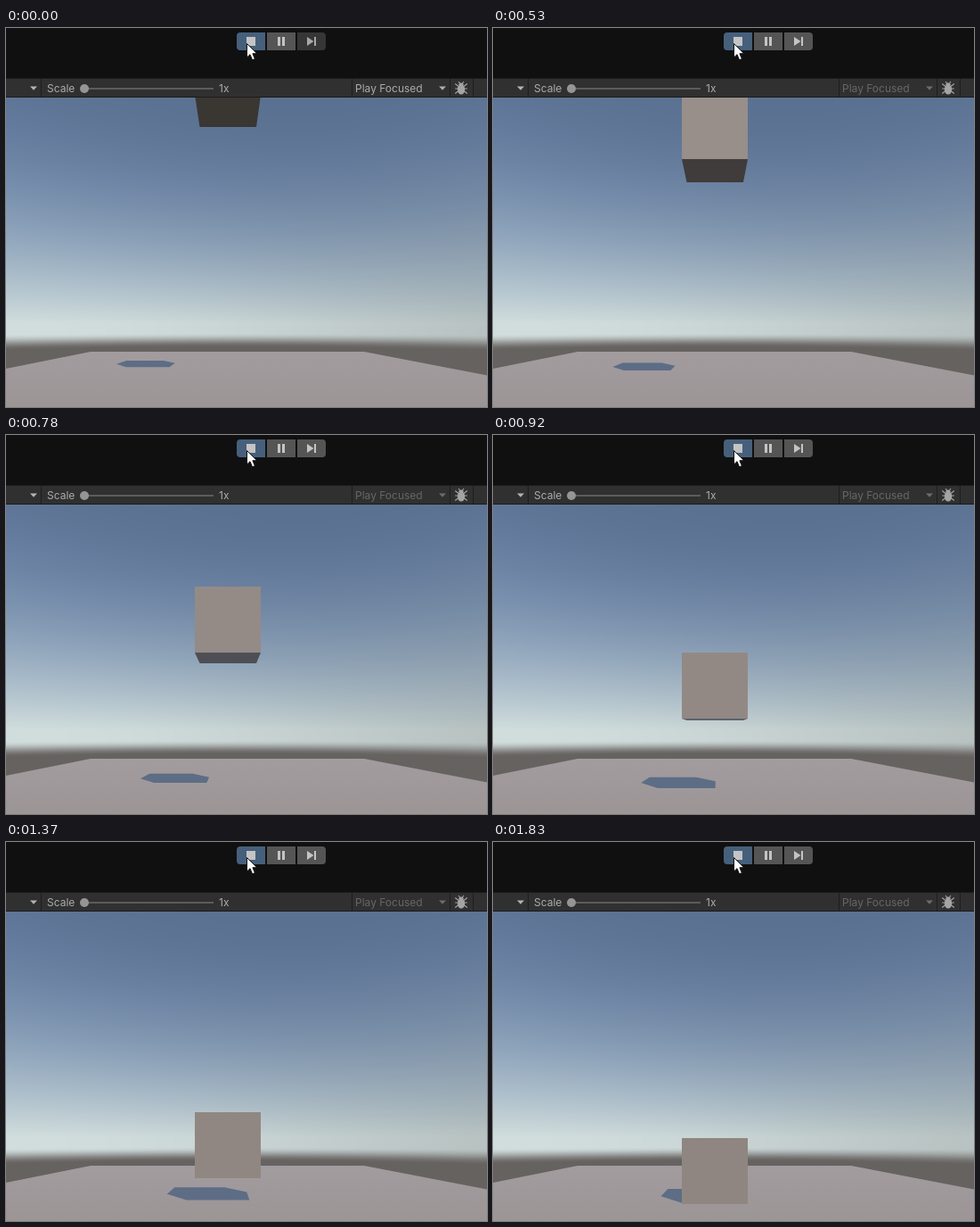
Write an HTML page with a canvas that moves like this. It is 540x425 px and loops after 2130 ms.

```html
<!DOCTYPE html>
<html lang="en">
<head>
<meta charset="utf-8">
<title>Falling cube</title>
<style>
  html, body { margin: 0; width: 100%; height: 100%; overflow: hidden; background: #101010; }
  canvas { position: absolute; left: 0; top: 0; width: 540px; height: 425px; }
  span {
    position: absolute; top: 58px; color: #acacac; white-space: nowrap;
    font: 12px/20px Inter, Roboto, sans-serif;
  }
</style>
</head>
<body>
<canvas id="stage" width="540" height="425"></canvas>
<span style="left:46px">Scale</span>
<span style="left:239px">1x</span>
<span id="mode" style="left:392px">Play Focused</span>
<script>
const W = 540, H = 425, TOP = 78, LOOP = 2130, STEP = 35, READY = 70;
const ctx = document.getElementById('stage').getContext('2d');
const mode = document.getElementById('mode');

// Camera: vanishing point, focal length in px, eye height in cube units
const CX = 250.3, HORIZON = 333, FOCAL = 462.5, EYE = 0.968;
const NEAR = 6.25, FAR = 7.25, LEFT = -0.515, RIGHT = 0.485, SIZE = 74;
const LIGHT = { x: -0.416, z: 0.727 };
const SUN = [0.32, 0.77, -0.56];

// Fall: seconds and screen px
const START = 0.064, Y0 = 75, FLOOR = 405.7, HALF_G = 339, BOUNCE = 0.294;

const ZENITH = [91, 113, 145], HAZE = [201, 213, 212], SKY_EASE = [2, 1.85, 1.5];
const EARTH = [102, 98, 96];

const clamp = k => Math.min(1, Math.max(0, k));
const smooth = k => k * k * (3 - 2 * k);
const blend = (a, b, k) => a.map((v, i) => v + (b[i] - v) * k);
const rgb = c => `rgb(${c.map(Math.round).join(',')})`;

function poly(g, points, fill) {
  g.beginPath();
  points.forEach(p => g.lineTo(p[0], p[1]));
  g.closePath();
  g.fillStyle = fill;
  g.fill();
}

function rect(g, x, y, w, h, fill) {
  g.fillStyle = fill;
  g.fillRect(x, y, w, h);
}

function dot(g, x, y, rx, ry, fill) {
  g.beginPath();
  g.ellipse(x, y, rx, ry, 0, 0, Math.PI * 2);
  g.fillStyle = fill;
  g.fill();
}

// Rayleigh phase: the sky dims at right angles to the sun
function phase(dx, dy) {
  const cos = (SUN[0] * dx - SUN[1] * dy + SUN[2] * FOCAL) / Math.hypot(dx, dy, FOCAL);
  return 1 + cos * cos;
}

function skyColor(x, y) {
  const dx = x - CX, dy = y - HORIZON;
  // lines of equal elevation bend away from the horizon at the sides
  const level = HORIZON + dy * FOCAL / Math.hypot(FOCAL, dx);
  const low = 1 - clamp((331 - level) / 253);
  const glow = Math.sqrt(phase(dx, dy) / phase(0, dy));
  const sky = ZENITH.map((z, i) => (z + (HAZE[i] - z) * low ** SKY_EASE[i]) * glow);
  return blend(sky, EARTH, smooth(clamp((level - 342) / 16)));
}

// Sky and ground plane never change
function makeScene() {
  const c = document.createElement('canvas');
  c.width = W;
  c.height = H;
  const g = c.getContext('2d');
  const img = g.createImageData(W, H);
  for (let y = TOP; y < H; y++) {
    for (let x = 0; x < W; x++) {
      img.data.set([...skyColor(x, y + 0.5), 255], (y * W + x) * 4);
    }
  }
  g.putImageData(img, 0, 0);
  const ground = g.createLinearGradient(0, 363, 0, H);
  ground.addColorStop(0, '#a29c9f');
  ground.addColorStop(1, '#9b9596');
  poly(g, [[95, 363], [402, 363], [540, 389.5], [540, H], [0, H], [0, 382]], ground);
  return c;
}
const scene = makeScene();

// Screen y of the cube's lower front edge
function cubeY(t) {
  t -= START;
  if (t <= 0) return Y0;
  const drop = Math.sqrt((FLOOR - Y0) / HALF_G);
  if (t < drop) return Y0 + HALF_G * t * t;
  t -= drop;
  let v = 2 * HALF_G * drop * BOUNCE;
  for (let i = 0; i < 2; i++) {
    const air = v / HALF_G;
    if (t < air) return FLOOR - v * t + HALF_G * t * t;
    t -= air;
    v *= BOUNCE;
  }
  return FLOOR;
}

// Shadow of a cube corner at a given height on the ground
function cast(x, z, height) {
  const s = FOCAL / (z + LIGHT.z * height);
  return [CX + (x + LIGHT.x * height) * s, HORIZON + EYE * s];
}

function drawCube(exactY) {
  const low = (FLOOR - exactY) / SIZE, high = low + 1;
  poly(ctx, [
    cast(LEFT, NEAR, low), cast(RIGHT, NEAR, low), cast(RIGHT, FAR, low),
    cast(RIGHT, FAR, high), cast(LEFT, FAR, high), cast(LEFT, NEAR, high)
  ], '#5d6d85');

  const y = Math.round(exactY);
  const back = Math.round(HORIZON + (y - HORIZON) * NEAR / FAR);
  const fall = clamp((y - Y0) / 245);
  if (back > y) {
    const under = blend([58, 54, 50], [92, 100, 112], fall ** 1.6);
    poly(ctx, [[212, y], [286, y], [281, back], [217.5, back]], rgb(under));
  }
  const front = blend([154, 144, 140], [143, 134, 129], (y - Y0) / (FLOOR - Y0));
  rect(ctx, 212, y - SIZE, SIZE, SIZE, rgb(front));
}

function button(x, fill, corners) {
  ctx.beginPath();
  ctx.roundRect(x, 5, 32, 20, corners);
  ctx.fillStyle = fill;
  ctx.fill();
}

const arrow = (x, fill) => poly(ctx, [[x - 4, 65.5], [x + 4, 65.5], [x, 69.7]], fill);

function drawBug(x, y) {
  const tone = '#a4a4a4';
  ctx.strokeStyle = tone;
  ctx.lineWidth = 1.1;
  ctx.beginPath();
  for (const side of [-1, 1]) {
    for (const leg of [-1, 0, 1]) {
      ctx.moveTo(x + side * 3, y + 0.5 + leg * 2.5);
      ctx.lineTo(x + side * 6.8, y + 0.5 + leg * 5.5);
    }
    ctx.moveTo(x + side, y - 5);
    ctx.lineTo(x + side * 3, y - 7.5);
  }
  ctx.stroke();
  dot(ctx, x, y + 1.5, 4.2, 5.6, tone);
  dot(ctx, x, y - 4, 2.7, 2.1, tone);
}

function drawCursor() {
  poly(ctx, [[270.5, 17.5], [270.5, 33], [274, 29.7], [276.6, 35.8], [279.4, 34.6],
    [276.9, 28.7], [281.8, 28.7]], '#fff');
  ctx.strokeStyle = '#111';
  ctx.lineWidth = 1;
  ctx.stroke();
}

function drawBars(ready) {
  rect(ctx, 0, 0, W, 56, '#101010');
  rect(ctx, 0, 56, W, 22, '#1b1b1b');
  rect(ctx, 0, 57, W, 20, '#303030');
  for (const x of [39, 388, 498, 524]) rect(ctx, x, 57, 1, 20, '#1e1e1e');

  button(259, '#46607c', [4, 0, 0, 4]);
  button(293, '#555555', 0);
  button(327, ready ? '#555555' : '#363636', [0, 4, 4, 0]);
  const icon = '#c4c4c4', skip = ready ? icon : '#a8a8a8';
  rect(ctx, 270, 10, 10, 10, icon);
  for (const x of [305, 310]) rect(ctx, x, 10, 3, 10, icon);
  poly(ctx, [[338, 10], [345.5, 15], [338, 20]], skip);
  rect(ctx, 346, 10, 2, 10, skip);

  arrow(31, '#b4b4b4');
  arrow(490, ready ? '#6c6c6c' : '#acacac');
  rect(ctx, 88, 67, 145, 2, '#5c5c5c');
  dot(ctx, 88, 68, 5, 5, '#959595');
  drawBug(511, 67.5);
  drawCursor();
}

const begin = performance.now();

function draw() {
  const ms = (performance.now() - begin) % LOOP;
  const t = Math.floor(ms / STEP) * STEP;
  const ready = t >= READY;
  ctx.drawImage(scene, 0, 0);
  drawCube(cubeY(t / 1000));
  drawBars(ready);
  mode.style.color = ready ? '#676767' : '#acacac';
  requestAnimationFrame(draw);
}
draw();
</script>
</body>
</html>
```
